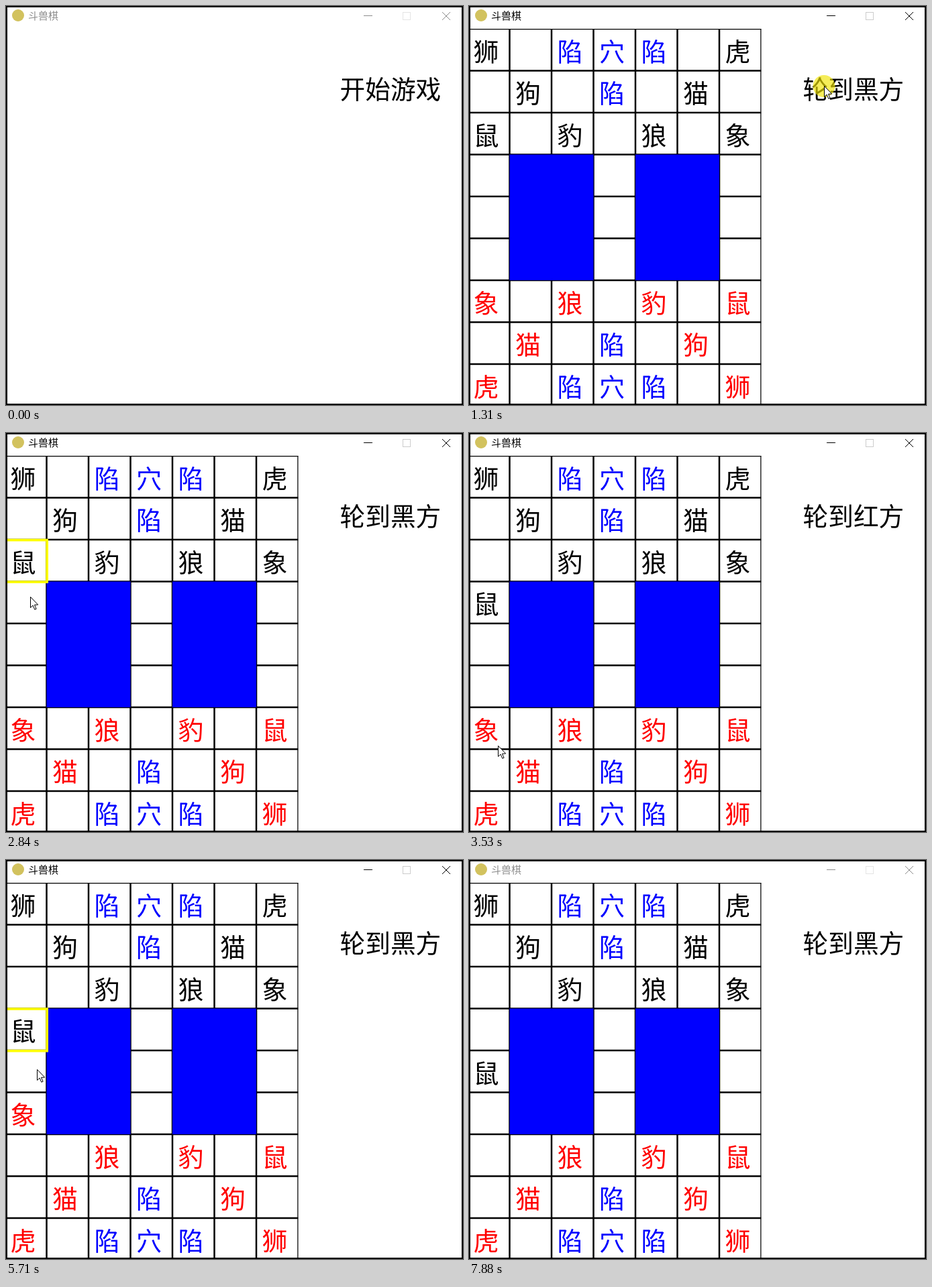
These frames come from a looping animation (681 by 595 pixels, 8.03 s). An HTML page with a canvas:

```html
<!DOCTYPE html>
<html lang="zh-CN">
<head>
<meta charset="utf-8">
<title>斗兽棋</title>
<style>
html, body { margin: 0; width: 100%; height: 100%; overflow: hidden; background: #fff; }
canvas { display: block; }
</style>
</head>
<body>
<canvas id="stage" width="681" height="595"></canvas>
<script>
const ctx = document.getElementById('stage').getContext('2d');
const W = 681, H = 595, LOOP = 8030, STEP = 77, HOLD = 140;
const FOCUS = 130, LEAVE = 7140, BLUR = 7880;
const SCALE = 1.25, CELL = 50 * SCALE, LEFT = -2, TOP = 34;
const FONT = '"Noto Sans CJK SC", "Noto Sans CJK", "Noto Sans", sans-serif';
const BLACK = '#000', RED = '#f00', BLUE = '#00f', YELLOW = '#ff0';

const SETUP = [
  '狮 陷穴陷 虎', ' 狗 陷 猫 ', '鼠 豹 狼 象', '', '', '',
  '象 狼 豹 鼠', ' 猫 陷 狗 ', '虎 陷穴陷 狮'
];

// Straight or bowed pointer glides; some end in a click.
const START = { x: 622, y: 605 };
const GLIDES = [
  { from: 130, to: 910, x: 529, y: 119, bow: 0.15, click: 1310 },
  { from: 1690, to: 2310, x: 22, y: 187, bow: -0.35, click: 2460 },
  { from: 2610, to: 2920, x: 40, y: 258, click: 3000 },
  { from: 3150, to: 3380, x: 39, y: 428 },
  { from: 3460, to: 3920, x: 40, y: 560, bow: -0.07 },
  { from: 4070, to: 4530, x: 29, y: 445, click: 4690 },
  { from: 4840, to: 5000, x: 40, y: 378, click: 5080 },
  { from: 5230, to: 5310, x: 41, y: 260, click: 5400 },
  { from: 5550, to: 5710, x: 46, y: 312, click: 5780 },
  { from: 5950, to: 6180, x: 44, y: 378, click: 6250 },
  { from: 6400, to: 6550, x: 36, y: 327, click: 6700 },
  { from: 6950, to: 7050, x: 353, y: 416 }
];
const CLICKS = GLIDES.filter(g => g.click);

function newGame() {
  const pieces = SETUP.flatMap((line, row) => [...line].map((ch, col) => {
    const fixed = '陷穴'.includes(ch);
    return { ch, col, row, fixed, color: fixed ? BLUE : row < 4 ? BLACK : RED };
  })).filter(p => p.ch !== ' ');
  return { pieces, started: false, chosen: null, turn: '黑' };
}

function play(game, { x, y }) {
  if (!game.started) {
    game.started = true;
    return;
  }
  const col = Math.floor((x - LEFT) / CELL), row = Math.floor((y - TOP) / CELL);
  const there = game.pieces.find(p => p.col === col && p.row === row);
  const mover = game.chosen;
  if (!mover) {
    game.chosen = there;
    return;
  }
  // The rat beats the elephant.
  const loser = there && mover.ch === '象' && there.ch === '鼠' ? mover : there;
  game.pieces = game.pieces.filter(p => p !== loser);
  Object.assign(mover, { col, row });
  game.chosen = null;
  game.turn = game.turn === '黑' ? '红' : '黑';
}

function gameAt(t) {
  const game = newGame();
  for (const g of CLICKS) if (t >= g.click) play(game, g);
  return game;
}

function pointerAt(t) {
  const i = GLIDES.findLastIndex(g => t >= g.from);
  const a = GLIDES[i - 1] || START, b = GLIDES[i], bow = b.bow || 0;
  const steps = Math.round((b.to - b.from) / STEP) + 1;
  const u = Math.min(1, (Math.floor((t - b.from) / STEP + 0.1) + 1) / steps);
  const dx = b.x - a.x, dy = b.y - a.y, bend = 2 * u * (1 - u) * bow;
  return { x: Math.round(a.x + dx * u - dy * bend), y: Math.round(a.y + dy * u + dx * bend) };
}

function rect(x, y, w, h, color) {
  ctx.fillStyle = color;
  ctx.fillRect(x, y, w, h);
}

function disc(x, y, r, color) {
  ctx.fillStyle = color;
  ctx.beginPath();
  ctx.arc(x, y, r, 0, Math.PI * 2);
  ctx.fill();
}

function text(s, x, y, size, color) {
  ctx.font = `${size}px ${FONT}`;
  ctx.fillStyle = color;
  ctx.fillText(s, x, y);
}

function titleBar(active) {
  const ink = active ? BLACK : '#8c8c8c';
  disc(18, 14, 9, '#d2c25e');
  text('斗兽棋', 33, 20, 15, ink);
  rect(533, 14, 13, 1, ink);
  ctx.lineWidth = 1;
  ctx.strokeStyle = active ? '#ccc' : '#e4e4e4';
  ctx.strokeRect(591.5, 9.5, 11, 11);
  ctx.strokeStyle = ink;
  ctx.beginPath();
  ctx.moveTo(650, 9);
  ctx.lineTo(662, 21);
  ctx.moveTo(662, 9);
  ctx.lineTo(650, 21);
  ctx.stroke();
}

// Every cell has a one-unit frame, so neighbours form a double line.
function board({ pieces, chosen }) {
  const right = LEFT + 7 * CELL, line = 2 * SCALE;
  ctx.save();
  ctx.beginPath();
  ctx.rect(0, TOP, right, H);
  ctx.clip();
  for (let k = 0; k < 9; k++) {
    rect(LEFT + k * CELL - SCALE, TOP, line, H, BLACK);
    rect(0, TOP + k * CELL - SCALE, right, line, BLACK);
  }
  for (const col of [1, 4]) {
    rect(LEFT + col * CELL, TOP + 3 * CELL, 2 * CELL, 3 * CELL, BLUE);
  }
  ctx.restore();

  if (chosen) {
    ctx.strokeStyle = YELLOW;
    ctx.lineWidth = 3 * SCALE;
    ctx.strokeRect(LEFT + SCALE / 2, TOP + chosen.row * CELL + SCALE / 2, CELL, CELL);
  }
  for (const { ch, col, row, color } of pieces) {
    text(ch, 6.5 + col * CELL, 81.7 + row * CELL, 38, color);
  }
}

function pointer(t) {
  const { x, y } = pointerAt(t);
  const pressed = CLICKS.some(g => t >= g.click && t < g.click + HOLD);
  if (pressed) disc(x, y + 0.5, 16.5, 'rgba(240, 228, 0, 0.65)');
  ctx.save();
  ctx.translate(x + 0.5, y + 0.5);
  ctx.fillStyle = '#fff';
  ctx.strokeStyle = BLACK;
  ctx.lineWidth = 1;
  const arrow = new Path2D('M0 0V16L3.6 12.6 6.3 18.8 8.6 17.8 6 11.8 11.2 11.6Z');
  ctx.fill(arrow);
  ctx.stroke(arrow);
  ctx.restore();
}

function border() {
  ctx.strokeStyle = BLACK;
  ctx.lineWidth = 4;
  ctx.strokeRect(0, 0, W, H);
}

function draw(t) {
  const game = gameAt(t);
  rect(0, 0, W, H, '#fff');
  titleBar(t >= FOCUS && t < BLUR);
  if (game.started) board(game);
  text(game.started ? `轮到${game.turn}方` : '开始游戏', 497.5, 137.7, 37.7, BLACK);
  if (t >= FOCUS && t < LEAVE) pointer(t);
  border();
}

const begin = performance.now();
function tick() {
  draw((performance.now() - begin) % LOOP);
  requestAnimationFrame(tick);
}
tick();
</script>
</body>
</html>
```
